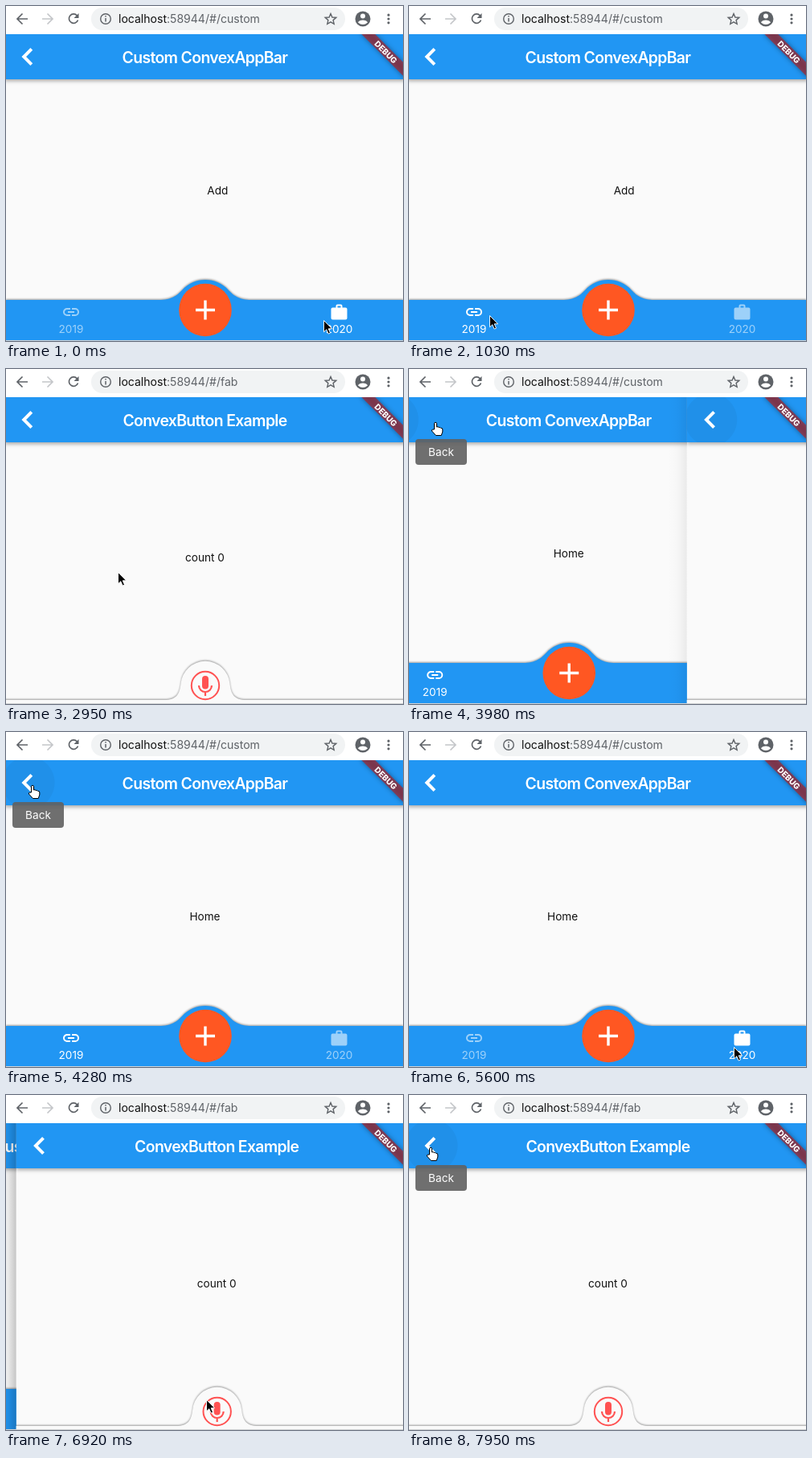
Write an HTML page that moves like this. It is 494 by 416 pixels and loops after 8000 ms.

```html
<!DOCTYPE html>
<html lang="en">
<head>
<meta charset="utf-8">
<title>ConvexAppBar demo</title>
<style>
  html, body { margin: 0; height: 100%; overflow: hidden; background: #fafafa; }
  svg { display: block; width: 494px; height: 416px; }
  text { font: 13.6px Inter, "Open Sans", sans-serif; fill: #111; }
  .mid { text-anchor: middle; }
  .light { fill: #fff; }
  .title { font-size: 19.4px; font-weight: 600; letter-spacing: -.034em; fill: #fff; }
  .url { font-size: 14.05px; }
  .appbar { fill: #2196f3; filter: drop-shadow(0 2px 2.5px rgba(0, 0, 0, .35)); }
  .convex { filter: drop-shadow(0 -.5px 1.3px rgba(0, 0, 0, .38)); }
  .hover { fill: #000; }
  .line { fill: none; stroke: #5f6368; stroke-width: 1.7; }
  .tab, .tab text { fill: #fff; }
</style>
</head>
<body>
<svg viewBox="0 0 494 416">
  <defs>
    <g id="header">
      <rect class="appbar" x="-2" y="30" width="498" height="61"/>
      <path class="hover" d="M11 35H45A33 33 0 0 1 45 91H11A33 33 0 0 1 11 35"/>
      <path fill="#fff" stroke="#fff" stroke-width="1.5" d="M11.67 3.87 9.9 2.1 0 12l9.9 9.9 1.77-1.77L3.54 12z" transform="translate(20.5 51)"/>
    </g>
    <linearGradient id="edge">
      <stop offset="0" stop-opacity="0"/>
      <stop offset=".3" stop-opacity=".016"/>
      <stop offset=".6" stop-opacity=".07"/>
      <stop offset="1" stop-opacity=".22"/>
    </linearGradient>
    <clipPath id="content"><rect x="-2" y="35" width="498" height="381"/></clipPath>
  </defs>

  <g id="customPage">
    <rect y="35" width="494" height="381" fill="#fafafa"/>
    <g id="views">
      <text class="mid" x="247.5" y="233.5">Home</text>
      <text class="mid" x="741.5" y="233.5">Add</text>
    </g>
    <use href="#header"/>
    <text class="title mid" x="247.5" y="70.5">Custom ConvexAppBar</text>
    <path class="convex" fill="#2196f3" d="M0 365H190C207 365 213 359 219 353C227 344 237 340 248 340S269 344 277 353C283 359 289 365 306 365H494V420H0z"/>
    <circle cx="248" cy="377.5" r="32.8" fill="#ff5722"/>
    <path d="M248 365.5v24M236 377.5h24" stroke="#fff" stroke-width="3.4"/>
    <g class="tab" id="tab2019">
      <path transform="translate(69 368)" d="M3.9 12c0-1.710 1.390-3.100 3.100-3.100h4V7H7a5 5 0 0 0 0 10h4v-1.900H7c-1.710 0-3.100-1.390-3.100-3.100zM8 13h8v-2H8v2zm9-6h-4v1.900h4a3.100 3.100 0 0 1 0 6.200h-4V17h4a5 5 0 0 0 0-10z"/>
      <text class="mid" x="81" y="406.3">2019</text>
    </g>
    <g class="tab" id="tab2020">
      <path transform="translate(402.5 368.5)" d="M20 6h-4V4a2 2 0 0 0-2-2h-4a2 2 0 0 0-2 2v2H4a2 2 0 0 0-2 2v11a2 2 0 0 0 2 2h16a2 2 0 0 0 2-2V8a2 2 0 0 0-2-2zm-6 0h-4V4h4v2z"/>
      <text class="mid" x="414.5" y="406.3">2020</text>
    </g>
  </g>

  <g id="fabPage">
    <rect id="edgeShade" x="-26.7" y="35" width="24.7" height="381" fill="url(#edge)"/>
    <g clip-path="url(#content)">
      <rect x="-2" y="35" width="498" height="381" fill="#fafafa"/>
      <use href="#header"/>
      <text class="title mid" x="247.5" y="70.5">ConvexButton Example</text>
      <text class="mid" x="247.5" y="238.5">count 0</text>
      <path class="convex" fill="#fafafa" d="M-5 411H197C212 411 216 404 217.5 391A30.6 30.6 0 0 1 278.5 391C280 404 284 411 299 411H499V425H-5z"/>
      <circle cx="248" cy="393" r="17.2" fill="none" stroke="#ff5252" stroke-width="2"/>
      <g fill="none" stroke="#ff5252">
        <path d="M248 385v8.5" stroke-width="8" stroke-linecap="round"/>
        <path d="M240 393a8 8 0 0 0 16 0M248 401v5" stroke-width="2.2"/>
      </g>
    </g>
  </g>

  <g transform="translate(498 34) rotate(45)">
    <rect x="-40" y="28" width="80" height="12" fill="#b71c1c" fill-opacity=".63" style="filter: drop-shadow(0 0 3px rgba(0, 0, 0, .6))"/>
    <text class="light mid" x="-1.4" y="38" style="font-size: 10px; font-weight: 800">DEBUG</text>
  </g>

  <g id="browser">
    <rect width="494" height="35" fill="#fff"/>
    <rect x="106" y="2" width="316" height="28" rx="14" fill="#f1f3f4"/>
    <path class="line" d="M27 16H14M20.5 9.5 14 16l6.5 6.5"/>
    <path class="line" style="stroke: #c4c6c9" d="M45 16H58M51.5 9.5 58 16l-6.5 6.5"/>
    <path class="line" d="M88.5 12A5.7 5.7 0 1 0 89.5 17.5"/>
    <path fill="#5f6368" d="M90.5 9v6h-6z"/>
    <circle class="line" style="stroke-width: 1.4" cx="124" cy="16" r="6.3"/>
    <path class="line" style="stroke-width: 1.5" d="M124 15v4.5M124 12v1.6"/>
    <text class="url" x="140" y="21">localhost<tspan id="route" fill="#5f6368"></tspan></text>
    <path class="line" style="stroke-width: 1.4" d="M404 9.5l1.9 4.5 4.9.4-3.7 3.2 1.1 4.8-4.2-2.5-4.2 2.5 1.1-4.8-3.7-3.2 4.9-.4z"/>
    <circle cx="444" cy="16" r="9.5" fill="#5f6368"/>
    <circle cx="444" cy="12.5" r="3" fill="#fff"/>
    <path d="M438 20.5c1-4 11-4 12 0q-6 5-12 0" fill="#fff"/>
    <path d="M476 11.2h.01M476 16h.01M476 20.8h.01" stroke="#5f6368" stroke-width="3.2" stroke-linecap="round"/>
  </g>

  <g id="tooltip">
    <rect x="8" y="87" width="64" height="32" rx="4" fill="#616161" fill-opacity=".9"/>
    <text class="light mid" x="40" y="108.3">Back</text>
  </g>
  <rect y="415" width="494" height="1" fill="#cfd1d3"/>

  <g id="pointer">
    <path id="arrow" transform="translate(-.5 -.5) scale(.92)" d="M0 0V15.5L3.6 12.2 6.1 18 8.7 16.9 6.2 11.2H11z" stroke="#fff"/>
    <path id="hand" transform="translate(-5.5 0)" fill="#fff" stroke="#000" d="M4 9V1.8a1.5 1.5 0 0 1 3 0V6q2-.8 2.6.6 2-.6 2.5.8 2.2-.3 2.2 1.6v3l-1.6 4.5H6L1 11q-.6-1.6.8-1.8z"/>
  </g>
</svg>

<script>
const LOOP = 8000, STEP = 147.2, WIDTH = 494;
const $ = id => document.getElementById(id);
const clamp = v => Math.min(1, Math.max(0, v));

function bezier(x1, y1, x2, y2) {
  const at = (a, b, s) => 3 * a * s * (1 - s) ** 2 + 3 * b * s * s * (1 - s) + s ** 3;
  return v => {
    if (v <= 0 || v >= 1) return clamp(v);
    let lo = 0, hi = 1;
    for (let i = 0; i < 24; i++) {
      const s = (lo + hi) / 2;
      if (at(x1, x2, s) < v) lo = s; else hi = s;
    }
    return at(y1, y2, lo);
  };
}
const ease = bezier(.25, .1, .25, 1);
const easeOut = bezier(.35, .91, .33, .97);

// Start times of taps, in ms
const toAdd = [-232, 5560], toHome = 1013;
const push = [2090, 6653], pop = 3858;

// Pointer path: step, x, y
const path = [
  [0, 396, 391], [1, 390, 390], [6, 125, 386], [7, 101, 385], [8, 99, 386], [12, 239, 387],
  [19, 239, 387], [20, 140, 253], [21, 70, 130], [22, 33, 66], [29, 33, 66], [30, 45, 80],
  [33, 255, 290], [34, 313, 345], [35, 375, 385], [36, 405, 392], [38, 405, 392],
  [42, 265, 382], [43, 250, 379], [48, 250, 379], [49, 235, 358], [52, 75, 140],
  [53, 27, 65], [55, 27, 65]
];

function pointerAt(step) {
  const i = path.findIndex(p => p[0] > step);
  const [k0, x0, y0] = path[i - 1], [k1, x1, y1] = path[i];
  const f = (step - k0) / (k1 - k0);
  return [x0 + (x1 - x0) * f, y0 + (y1 - y0) * f];
}

const move = (id, x, y = 0) => $(id).setAttribute("transform", `translate(${x} ${y})`);
const show = (id, opacity) => { $(id).style.opacity = +opacity; };

function draw(now) {
  const step = Math.floor((now % LOOP + 10) / STEP), t = step * STEP;
  const slide = (start, ms, curve) => curve((t - start) / ms);

  const view = slide(toAdd[0], 300, ease) - slide(toHome, 300, ease) + slide(toAdd[1], 300, ease);
  move("views", -WIDTH * view);
  const addActive = t < toHome || t >= toAdd[1];
  show("tab2019", addActive ? .56 : 1);
  show("tab2020", addActive ? 1 : .56);

  const open = slide(push[0], 400, easeOut) - slide(pop, 400, easeOut) + slide(push[1], 400, easeOut);
  move("customPage", -WIDTH / 3 * open);
  move("fabPage", WIDTH * (1 - open));
  show("fabPage", open > 0);
  show("edgeShade", open);
  const onFab = (t >= push[0] && t < pop) || t >= push[1];
  $("route").textContent = ":58944/#/" + (onFab ? "fab" : "custom");

  const [x, y] = pointerAt(step);
  const hover = x < 61 && y < 91;
  move("pointer", x, y);
  show("hand", hover);
  show("arrow", !hover);
  document.querySelector(".hover").style.opacity = hover ? .045 : 0;
  const fade = start => clamp((t - start) / 150);
  show("tooltip", fade(3180) - fade(4380) + fade(7780));
}

const begin = performance.now();
function tick() {
  draw(performance.now() - begin);
  requestAnimationFrame(tick);
}
tick();
</script>
</body>
</html>
```
